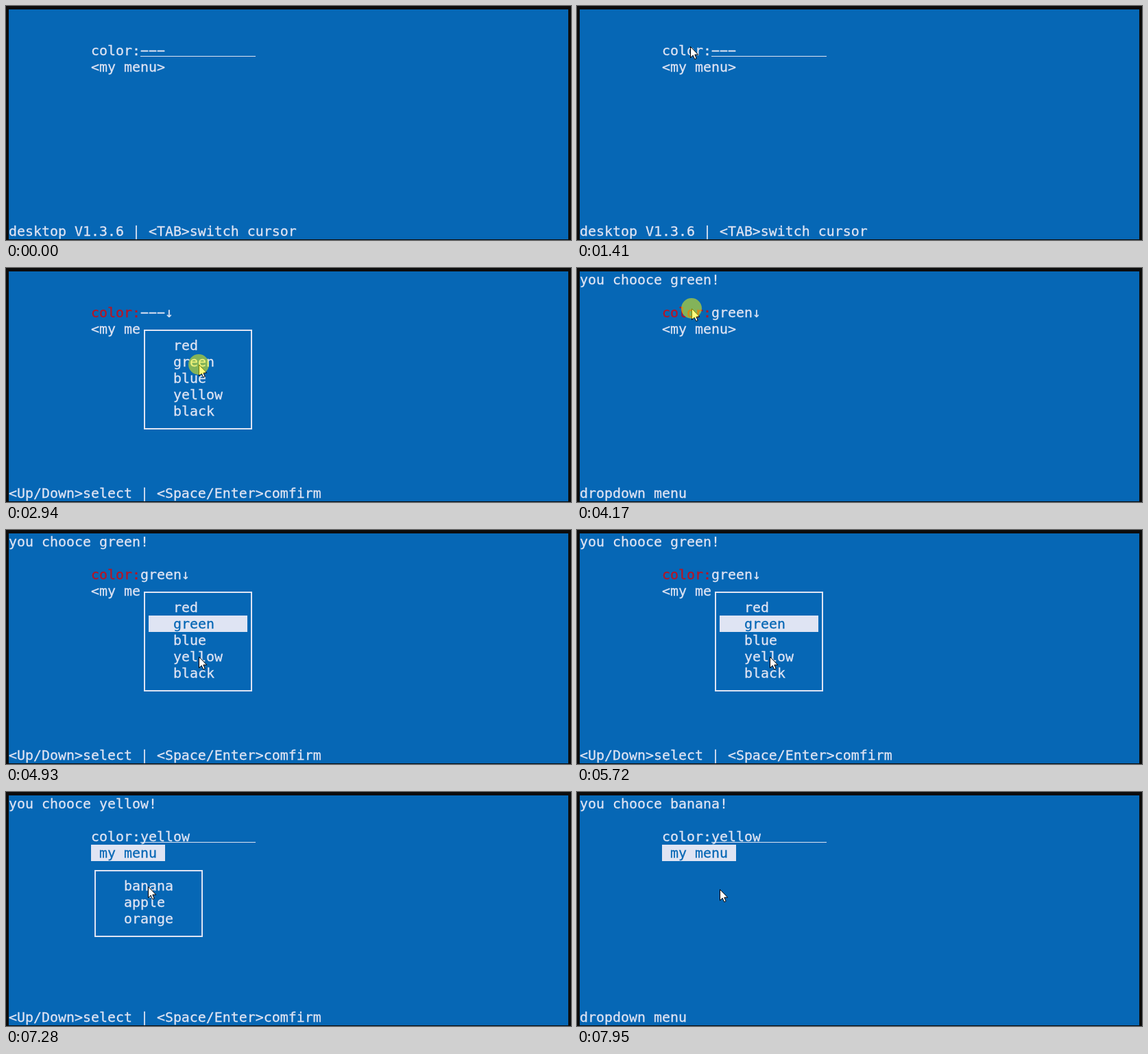
An HTML page that plays this animation: 824x342 px, repeating every 8000 ms.

```html
<!DOCTYPE html>
<html lang="en">
<head>
<meta charset="utf-8">
<title>Terminal menu</title>
<style>
  html, body { margin: 0; width: 100%; height: 100%; overflow: hidden; background: #0c0c0c; }
  svg { display: block; width: 824px; height: 342px; }
  text { font: 19.93px "DejaVu Sans Mono", "Noto Sans Mono", monospace; white-space: pre; stroke-width: .3px; }
</style>
</head>
<body>
<svg viewBox="0 0 824 342">
  <rect x="4" y="5" width="816" height="336" fill="#0667b5"/>
  <g id="screen"></g>
  <path id="pointer" d="M.5 .5V16.6L4.2 13.1L6.7 18.7L9.2 17.6L6.8 12.1H11.7Z" fill="#fff" stroke="#000"/>
  <circle id="press" r="15" fill="#ff0" fill-opacity=".5"/>
</svg>
<script>
const LOOP = 8000, STEP = 66, LAG = 360, HOLD = 200;
const BLUE = '#0667b5', INK = '#dfe4f3', RED = '#b81424';
const COLORS = ['red', 'green', 'blue', 'yellow', 'black'];
const FRUIT = ['banana', 'apple', 'orange'];
const PICK = '<Up/Down>select | <Space/Enter>comfirm';
const DONE = 'dropdown menu';

// Character cells are 12 by 24 pixels.
const cx = col => 4 + 12 * col;
const cy = row => 5 + 24 * row;
const esc = s => s.replace(/</g, '&lt;').replace(/>/g, '&gt;');
const text = (col, row, s, color = INK) =>
  `<text x="${cx(col)}" y="${cy(row) + 19}" fill="${color}" stroke="${color}">${esc(s)}</text>`;
const fill = (col, row, cols, rows, color) =>
  `<rect x="${cx(col)}" y="${cy(row)}" width="${12 * cols}" height="${24 * rows}" fill="${color}"/>`;

function popup(col, row, items, chosen) {
  const rows = items.length + 2;
  const frame = `<rect x="${cx(col) + 6}" y="${cy(row) + 14}" width="156" height="${24 * (rows - 1)}"
    fill="none" stroke="${INK}" stroke-width="2"/>`;
  const lines = items.map((item, i) => {
    const on = item === chosen, r = row + 1 + i;
    return (on ? fill(col + 1, r, 12, 1, INK) : '') + text(col + 4, r, item, on ? BLUE : INK);
  });
  return fill(col, row, 14, rows, BLUE) + frame + lines.join('');
}

function scene({ said, value, focus, open, status }) {
  const drop = focus === 'color', menu = focus === 'menu';
  return text(0, 0, said && `you chooce ${said}!`) +
    text(10, 2, 'color:', drop ? RED : INK) +
    text(16, 2, value + (drop ? '\u2193' : '')) +
    (drop ? '' : `<path d="M${cx(16)} 73.5h168" stroke="${INK}"/>`) +
    (menu ? fill(10, 3, 9, 1, INK) + text(11, 3, 'my menu', BLUE) : text(10, 3, '<my menu>')) +
    (open && drop ? popup(16, 3, COLORS, value) : '') +
    (open && menu ? popup(10, 4, FRUIT) : '') +
    text(0, 13, status);
}

// Each click changes part of the state: when, what.
const clicks = [
  [1970, { focus: 'color', open: true, status: PICK }],
  [3180, { said: 'green', value: 'green', open: false, status: DONE }],
  [4380, { open: true, status: PICK }],
  [5770, { said: 'yellow', value: 'yellow', open: false, status: DONE }],
  [6750, { focus: 'menu', open: true, status: PICK }],
  [7950, { said: 'banana', open: false, status: DONE }]
];

// Pointer moves from its last place: start, duration, x, y.
const from = { x: 750, y: 328 };
const moves = [
  [210, 530, 320, 212],
  [740, 670, 165, 59],
  [1970, 770, 281, 141],
  [3250, 710, 167, 59],
  [4240, 690, 281, 185],
  [5800, 400, 198, 94],
  [6750, 660, 208, 142]
];

const $ = id => document.getElementById(id);
const show = (el, on) => { el.style.display = on ? '' : 'none'; };
const easeOut = u => 1 - (1 - u) ** 1.5;

let state = {
  said: '', value: '\u2212\u2212\u2212', focus: '', open: false,
  status: 'desktop V1.3.6 | <TAB>switch cursor'
};
const scenes = [state, ...clicks.map(([, change]) => state = { ...state, ...change })];
$('screen').innerHTML = scenes.map(s => `<g>${scene(s)}</g>`).join('');
const groups = [...$('screen').children];

function pointerAt(t) {
  let { x, y } = from;
  for (const [start, span, toX, toY] of moves) {
    if (t < start) break;
    const steps = Math.round(span / STEP);
    const u = easeOut(Math.min(1, Math.floor((t - start) / span * steps) / steps));
    x += (toX - x) * u;
    y += (toY - y) * u;
  }
  return [Math.round(x), Math.round(y)];
}

function draw() {
  const t = performance.now() % LOOP;
  const now = clicks.filter(([at]) => t >= at).length;
  groups.forEach((g, i) => show(g, i === now));
  show($('pointer'), t >= moves[0][0]);
  // The button goes down a little before the screen answers.
  show($('press'), clicks.some(([at]) => t >= at - LAG && t < at - LAG + HOLD));
  for (const id of ['pointer', 'press']) {
    $(id).setAttribute('transform', `translate(${pointerAt(t)})`);
  }
  requestAnimationFrame(draw);
}
draw();
</script>
</body>
</html>
```
